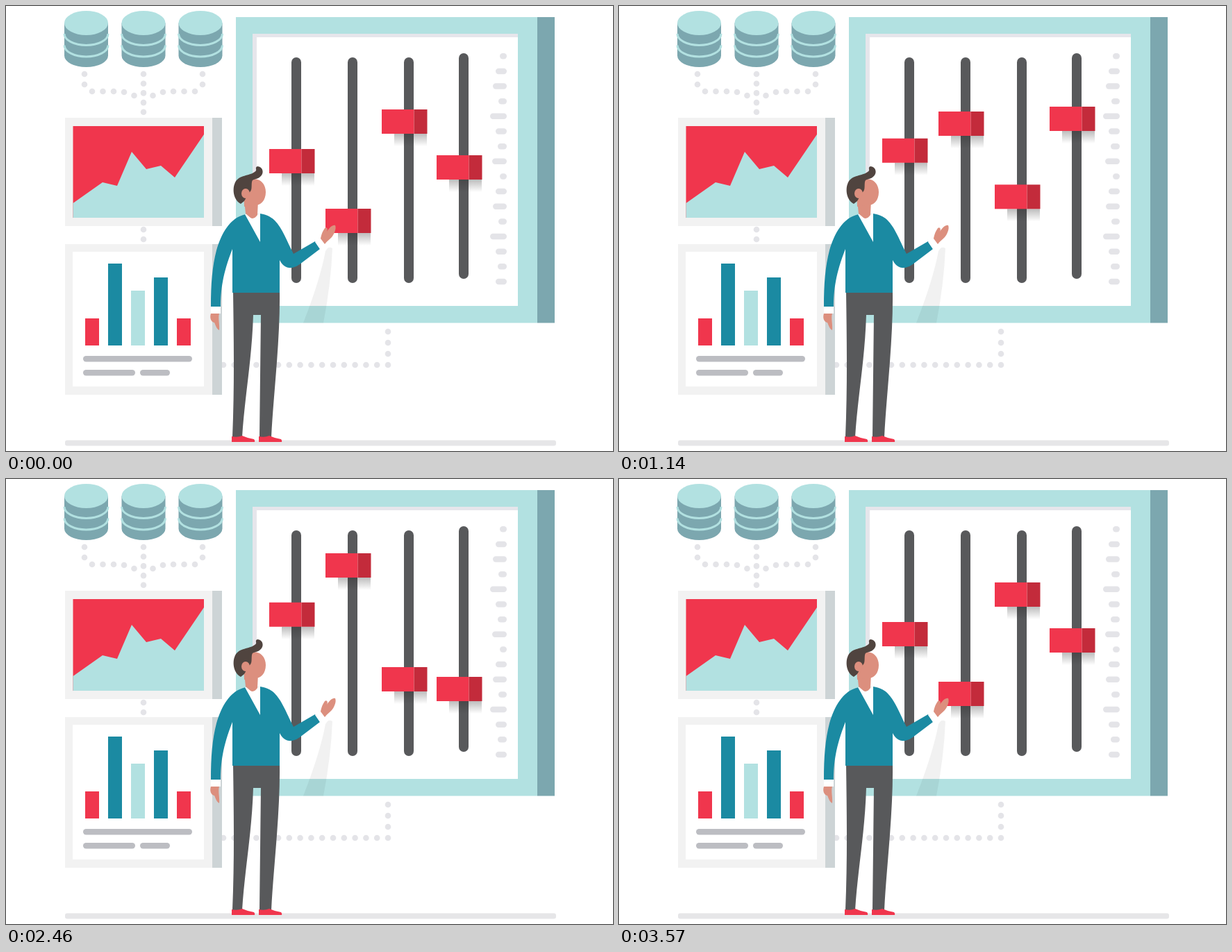
These frames come from a looping animation (874 px wide and 641 px high, 3600 ms). An HTML page:

```html
<!DOCTYPE html>
<html lang="en">
<head>
<meta charset="utf-8">
<title>Control panel</title>
<style>
  html, body { margin: 0; width: 100%; height: 100%; overflow: hidden; background: #fff; }
  svg { display: block; width: 100vw; height: 100vh; }
</style>
</head>
<body>
<svg id="stage" viewBox="0 0 874 641">
  <defs>
    <linearGradient id="fade" x2="0" y2="1">
      <stop stop-color="#222" stop-opacity=".3"/>
      <stop offset="1" stop-color="#222" stop-opacity="0"/>
    </linearGradient>
  </defs>
  <g id="back"></g>
  <g id="knobs"></g>
  <g id="person">
    <path fill="#58595b" d="M327 412H394C395 480 385 560 382 621H365L367 445H356C354 510 344 560 340 621H326C329 550 328 480 327 412Z"/>
    <path fill="#f0364d" d="M325 628V620Q333 622 340 619Q349 623 357 624Q359 626 358 628ZM364 628V620Q372 622 379 619Q388 623 396 624Q398 626 397 628Z"/>
    <path fill="#dc8f7e" d="M295 443H307C305 449 308 460 307 467C303 465 302 460 300 456C295 455 293 449 295 443Z"/>
    <path fill="#fff" d="M295 433H309V443H295Z"/>
    <path fill="#1b8aa2" d="M345 300C322 305 310 328 303 352C297 375 295 400 295 433H309C309 410 312 385 326 350V413H394V366C398 374 404 378 412 377Q418 376 423 372L452 350L445 339L414 357C405 340 398 320 387 309C380 302 372 300 366 299Z"/>
    <path fill="#fff" d="M344 300L366 299V340ZM445 340L453 334L460 344L452 350Z"/>
    <path fill="#dc8f7e" d="M343 280H363L362 301Q357 308 352 305L345 299ZM453 335C454 330 455 326 459 320C462 318 464 321 462 325C466 319 470 315 474 316C476 320 473 328 469 333C465 337 462 339 459 343Z"/>
    <path fill="#dc8f7e" d="M350 251C366 245 374 257 374 268C374 281 366 288 357 287L343 289L342 262Z"/>
    <path fill="#50443f" d="M338 285C326 278 326 262 330 254C336 243 350 245 358 239C363 236 357 233 362 231C368 231 371 237 369 242C366 249 358 249 355 251C352 256 356 265 350 269L343 281Z"/>
    <ellipse cx="345" cy="270" rx="6" ry="7" fill="#dc8f7e"/>
  </g>
</svg>
<script>
const RED = '#f0364d', DARK_RED = '#c32b3b', AQUA = '#b2e1e1', STEEL = '#7ca7af',
      TEAL = '#1b8aa2', PALE = '#e4e4e8', GREY = '#58595b';

const rect = (x, y, w, h, fill, r = 0) =>
  `<rect x="${x}" y="${y}" width="${w}" height="${h}" rx="${r}" fill="${fill}"/>`;
const path = (d, fill, extra = '') => `<path d="${d}" fill="${fill}" ${extra}/>`;
const dot = (x, y) => `<circle cx="${x}" cy="${y}" r="4.3" fill="${PALE}"/>`;

function cylinder(cx) {
  const arc = y => `M${cx - 31.5} ${y}a31.5 16.5 0 0 0 63 0`;
  return path(arc(71.5) + `V24.5h-63Z`, STEEL)
    + path(arc(40) + arc(56.5), 'none', `stroke="${AQUA}" stroke-width="3"`)
    + `<ellipse cx="${cx}" cy="24.5" rx="31.5" ry="17.5" fill="${AQUA}"/>`;
}

function panel(y, h) {
  return rect(85, y, 212, h, '#f2f2f2') + rect(297, y, 14, h, '#cdd4d6');
}

function scenery() {
  let s = rect(85, 625.5, 707, 8, '#e6e6e8', 3);

  // connecting dots
  for (const [dx, y] of [[85, 98], [85, 113], [74, 123], [58.5, 123], [43, 123], [28, 124], [13.5, 129]])
    s += dot(198 - dx, y) + dot(198 + dx, y);
  for (let i = 0; i < 5; i++) s += dot(198, 98 + i * 13.7);
  for (const y of [322, 336]) s += dot(198, y);
  for (let i = 0; i < 16; i++) s += dot(550 - i * 15.8, 517);
  for (let i = 0; i < 3; i++) s += dot(550, 469 + i * 16);
  s += [115.5, 198, 280].map(cylinder).join('');

  // area chart
  s += panel(161, 156) + rect(96.5, 173, 188.5, 132, RED)
    + path('M96.5 284L139 254L160 259L181 210L202 235L223 230L243 247L285 185V305H96.5Z', AQUA);

  // bar chart
  s += panel(343, 217) + rect(96, 354, 189, 194, '#fff');
  [[450, RED], [371, TEAL], [410, AQUA], [391, TEAL], [450, RED]].forEach(([y, fill], i) => {
    s += rect(114 + i * 33, y, 20, 489 - y, fill);
  });
  for (const [x, y, w] of [[111, 504, 157], [111, 524, 75], [193, 524, 43]])
    s += rect(x, y, w, 8.5, '#bcbdc2', 4.2);

  // board
  s += rect(331, 16, 434, 440.5, AQUA) + rect(765, 16, 25, 440.5, STEEL)
    + rect(355, 40, 382, 392, '#e6e6eb') + rect(361, 45, 376, 387, '#fff');
  [711, 705, 701, 709, 697, 705, 708, 700, 711, 705, 701, 709, 697, 705, 708, 705].forEach((x, i) => {
    s += rect(x, 68 + i * 21.65, 721 - x, 8.5, PALE, 4.2);
  });
  s += path('M428 456.5Q452 395 460 353Q464 345 470 349Q468 400 457 456.5Z', '#000', 'opacity=".055"');
  sliders.forEach(({ x, top }) => s += rect(x + 32, top, 14, 325, GREY, 7));
  return s;
}

// moves: [start ms, end ms, new y]
const sliders = [
  { x: 379, top: 74, y: 206, moves: [[0, 450, 286], [750, 1460, 121], [1950, 2590, 184], [2960, 3560, 206]] },
  { x: 460, top: 74, y: 292, moves: [[385, 1090, 152], [1690, 2290, 107], [2895, 3520, 292]] },
  { x: 541, top: 74, y: 149, moves: [[600, 1290, 271], [2620, 3230, 149]] },
  { x: 620, top: 68, y: 215, moves: [[375, 1080, 145], [1725, 2375, 285], [2940, 3550, 215]] }
];

const ease = p => (1 - Math.cos(Math.PI * p)) / 2;

function positionAt({ y, moves }, t) {
  for (const [start, end, target] of moves) {
    const p = Math.min(1, Math.max(0, (t - start) / (end - start)));
    y += (target - y) * ease(p);
  }
  return y;
}

document.getElementById('back').innerHTML = scenery();
const knobs = document.getElementById('knobs');
knobs.innerHTML = sliders.map(() => '<g>'
  + rect(18, 35, 47, 18, 'url(#fade)')
  + rect(0, 0, 46.5, 35, RED) + rect(46.5, 0, 19, 35, DARK_RED) + '</g>').join('');

function draw() {
  const t = Math.floor(performance.now() % 3600 / 30) * 30;
  sliders.forEach((slider, i) =>
    knobs.children[i].setAttribute('transform', `translate(${slider.x} ${positionAt(slider, t)})`));
  requestAnimationFrame(draw);
}
draw();
</script>
</body>
</html>
```
